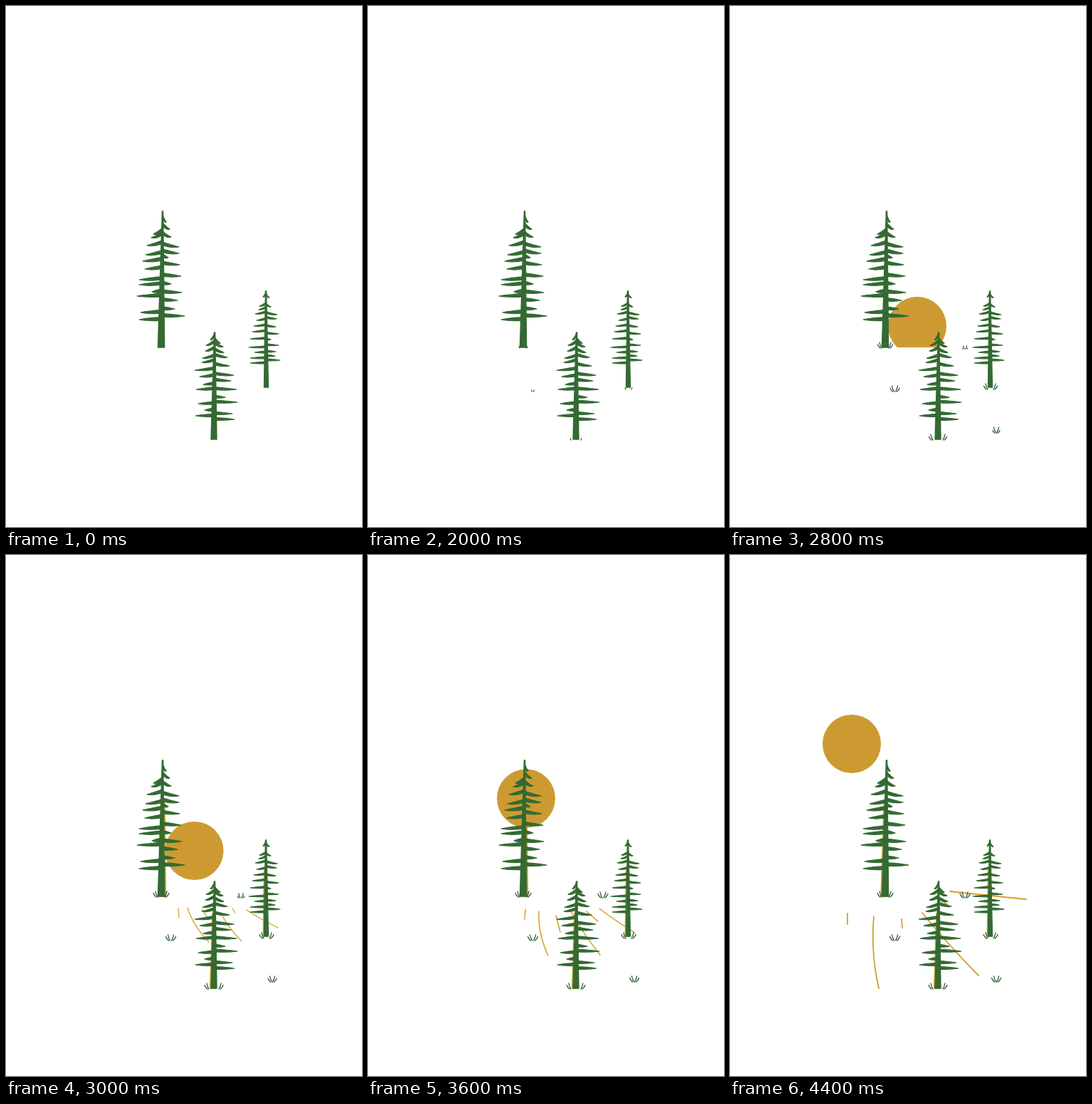
These frames come from a looping animation (500 by 731 pixels, 7.4 s). An HTML page with a canvas:

```html
<!DOCTYPE html>
<html lang="en">
<head>
<meta charset="utf-8">
<title>Sunrise over pines</title>
<style>
  html, body { margin: 0; width: 100%; height: 100%; overflow: hidden; background: #fff; }
  canvas { display: block; }
</style>
</head>
<body>
<canvas id="stage" width="500" height="731"></canvas>
<script>
const ctx = document.getElementById('stage').getContext('2d');
const GREEN = '#346a33', GRASS = '#2d5a32', SUN = '#cd9a32', LIGHT = '#d3a02c';
const LOOP = 7400, GROW_START = 2000, STEP = 200, LAST_STEP = 13, HORIZON = 479;

// Trunk from (x, top) to (x + lean, bottom); tips are [y, signed reach]
const tallPine = {
  x: 220, top: 288, bottom: 479, lean: -2, half: 4.6, thick: 2.3,
  tips: [[303, 5], [320, -13], [313, 10], [325, -16], [324, 12], [336, -22], [338, 23],
    [349, -24], [347, 23], [353, 8], [358, -28], [363, 24], [369, -25], [379, 26],
    [384, -33], [391, -33], [390, 12], [401, -15], [402, 27], [407, -36], [413, 21],
    [425, 17], [430, -31], [435, 31], [440, -33]],
};
const middlePine = {
  x: 293, top: 458, bottom: 608, lean: -1, half: 4, thick: 1.9,
  tips: [[468, -6], [473, 8], [476, -12], [478, 12], [484, -13], [486, 13], [494, -17],
    [493, 18], [500, -18], [505, 21], [511, -28], [518, 27], [520, -21], [526, 23],
    [531, -16], [538, -26], [538, 31], [549, 15], [558, -23], [556, 32], [567, -14],
    [572, 25], [575, -27], [580, 28]],
};
const smallPine = {
  x: 365, top: 400, bottom: 535, lean: 0.5, half: 3, thick: 1.3,
  tips: [[408, -4], [409, 5], [421, -9], [422, 7], [426, -10], [433, 16], [432, -15],
    [439, 15], [441, -13], [449, -17], [450, 14], [457, -19], [460, 18], [467, -22],
    [468, 7], [476, 18], [479, -24], [485, 14], [486, -16], [491, 13], [494, -22],
    [497, 20], [501, -22]],
};
const pines = [tallPine, middlePine, smallPine];

// [step, centre x, centre y, radius]
const sunPath = [
  [2, 257, 487, 20], [3, 258, 485, 29.5], [5, 263, 449, 41], [6, 264.5, 415, 41],
  [7, 254, 398, 41], [9, 222, 341.5, 41], [11, 190, 298, 41], [12, 173, 282, 41],
  [13, 171, 265, 41],
];

// Ground rays, each moving through [step, start x, start y, end x, end y]
const nearRays = [
  { bend: 0, path: [[6, 242, 496, 243, 509], [9, 221, 497, 220, 511], [13, 165, 503, 165, 518]] },
  { bend: -8, path: [[6, 255, 495, 285, 543], [9, 240, 500, 253, 562], [13, 202, 507, 209, 608]] },
  { bend: 0, path: [[6, 275, 497, 285, 512], [9, 264, 506, 270, 529], [13, 241, 511, 242, 523]] },
];
const farRays = [
  { bend: -4, path: [[6, 303, 505, 331, 542], [9, 285, 500, 326, 561], [13, 270, 502, 349, 590]] },
  { bend: 0, path: [[6, 318, 496, 322, 502], [9, 307, 500, 323, 514], [13, 297, 485, 305, 490]] },
  { bend: -3, path: [[6, 338, 498, 382, 523], [9, 325, 496, 375, 530], [11, 311, 484, 407, 496],
    [13, 309, 472, 416, 483]] },
];

// Tufts: [first step, x, y, half gap]
const tufts = [
  [1, 218, 480, 5], [1, 231.5, 541, 1], [1, 292, 609, 7],
  [1, 366, 538, 4], [2, 374, 599, 0.5], [4, 330, 481, 1],
];

function sample(keys, step) {
  const next = keys.findIndex(key => key[0] >= step);
  const b = keys[next], a = keys[Math.max(next - 1, 0)];
  const k = b === a ? 0 : (step - a[0]) / (b[0] - a[0]);
  return a.map((v, i) => v + (b[i] - v) * k).slice(1);
}

function strokeCurve(x0, y0, cx, cy, x1, y1) {
  ctx.beginPath();
  ctx.moveTo(x0, y0);
  ctx.quadraticCurveTo(cx, cy, x1, y1);
  ctx.stroke();
}

function drawTrunk({ x, top, bottom, lean, half }, color, shift = 0, from = 0) {
  const topX = x + lean * from + shift, topY = top + (bottom - top) * from;
  const baseX = x + lean + shift, w = 0.6 + (half - 0.6) * from;
  ctx.fillStyle = ctx.strokeStyle = color;
  ctx.lineWidth = 1.4;
  ctx.beginPath();
  ctx.moveTo(topX - w, topY);
  ctx.lineTo(topX + w, topY);
  ctx.lineTo(baseX + half, bottom);
  ctx.lineTo(baseX - half, bottom);
  ctx.closePath();
  ctx.fill();
  ctx.stroke();
}

function drawPine(pine) {
  const { x, top, bottom, lean, thick, tips } = pine;
  drawTrunk(pine, GREEN);
  ctx.lineWidth = 1.2;
  for (const [tipY, reach] of tips) {
    // Branches droop more near the crown
    const down = (tipY - top) / (bottom - top);
    const rootX = x + lean * down, bendX = rootX + reach * 0.6;
    const rootY = Math.max(top + 3, tipY - thick * (0.4 + 4 * (1 - down) ** 3));
    ctx.beginPath();
    ctx.moveTo(rootX, rootY - thick);
    ctx.quadraticCurveTo(bendX, tipY - thick, x + reach, tipY);
    ctx.quadraticCurveTo(bendX, tipY + thick, rootX, rootY + thick);
    ctx.fill();
    ctx.stroke();
  }
}

function drawSun(step) {
  const [x, y, radius] = sample(sunPath, step);
  ctx.save();
  if (step < 6) {
    ctx.beginPath();
    ctx.rect(0, 0, 500, HORIZON);
    ctx.clip();
  }
  ctx.fillStyle = SUN;
  ctx.beginPath();
  ctx.arc(x, y, radius, 0, Math.PI * 2);
  ctx.fill();
  ctx.restore();
}

function drawLight(step) {
  ctx.strokeStyle = LIGHT;
  ctx.lineWidth = 1.3 + (step - 6) * 0.07;
  for (const { bend, path } of [...nearRays, ...farRays]) {
    const [x0, y0, x1, y1] = sample(path, step);
    strokeCurve(x0, y0, (x0 + x1) / 2 + bend, (y0 + y1) / 2, x1, y1);
  }
  for (const pine of pines) {
    const shift = pine !== tallPine ? -1.3 : step < 10 ? 1.8 : -1.4;
    drawTrunk(pine, LIGHT, shift, 0.3);
  }
}

function drawGrass(step) {
  ctx.strokeStyle = GRASS;
  ctx.lineWidth = 1.3;
  for (const [first, x, y, gap] of tufts) {
    for (const side of [-1, 1]) {
      for (const outer of [0, 1]) {
        const grow = Math.min((step - first - outer * 1.5 + 1) / 4, 1);
        if (grow <= 0) continue;
        const baseX = x + side * (gap + outer * 2);
        const dx = side * (3 + outer) * grow, dy = -(8 - outer * 2.5) * grow;
        strokeCurve(baseX, y, baseX + dx * 0.7, y + dy * 0.4, baseX + dx, y + dy);
      }
    }
  }
}

function draw(time) {
  const step = Math.max(0, Math.min(LAST_STEP, Math.floor((time - GROW_START) / STEP) + 1));
  ctx.fillStyle = '#fff';
  ctx.fillRect(0, 0, 500, 731);
  ctx.lineCap = ctx.lineJoin = 'round';
  if (step >= 2) drawSun(step);
  if (step >= 6) drawLight(step);
  pines.forEach(drawPine);
  drawGrass(step);
}

const start = performance.now();
function frame() {
  draw((performance.now() - start) % LOOP);
  requestAnimationFrame(frame);
}
frame();
</script>
</body>
</html>
```
